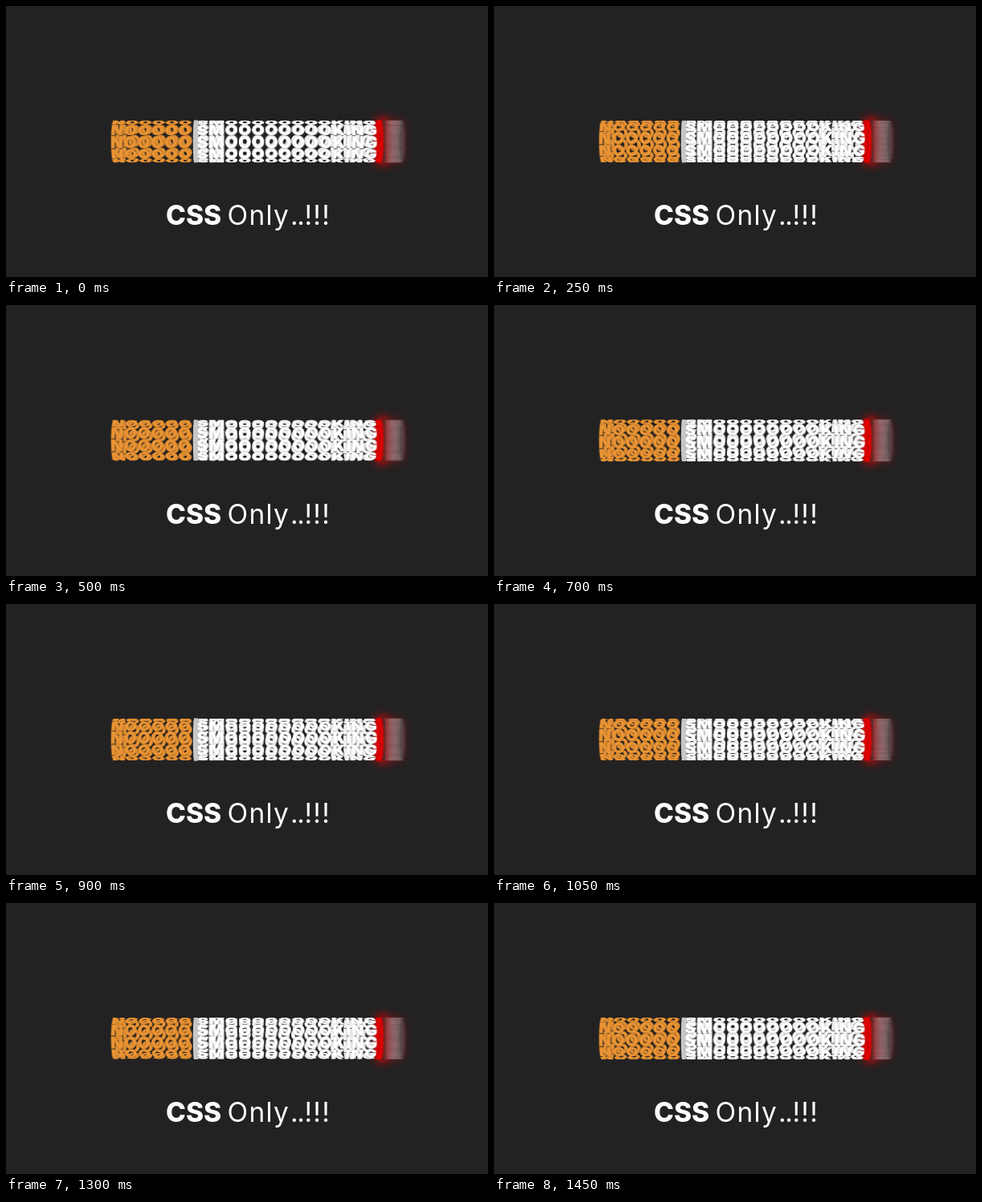
Recreate the animation shown at these times as an HTML page. Size 600 by 338 pixels, loop 1.5 s.

```html
<!DOCTYPE html>
<html lang="en">
<head>
<meta charset="utf-8">
<title>No smoking</title>
<style>
  html, body { margin: 0; width: 100%; height: 100%; overflow: hidden; background: #232223; }
  #stage {
    position: relative; width: 600px; height: 338px; overflow: hidden;
    background: #232223; perspective: 1470px;
    font-family: Inter, "Open Sans", sans-serif;
  }
  #drum { position: absolute; inset: 0; transform-style: preserve-3d; }
  .row { position: absolute; left: 0; top: 161px; width: 600px; height: 16px; }
  .row > * { position: absolute; top: 0; height: 16px; }
  .word {
    font-size: 20px; font-weight: 900; line-height: 16px; letter-spacing: 1px;
    white-space: nowrap; -webkit-text-stroke: .5px;
    text-shadow: 0 0 2px rgba(0, 0, 0, .55);
  }
  .filter { left: 133px; color: #ea9434; }
  .paper { left: 238.5px; color: #fff; }
  .row .seam { left: 234px; top: -.5px; width: 4.5px; height: 17px; background: #c8c8c8; }
  .row .ember {
    left: 460px; top: -.5px; width: 8px; height: 17px; filter: blur(1px);
    background: linear-gradient(90deg, rgba(190, 0, 0, .5), #e60000 40%, #e60000 75%, rgba(150, 0, 0, .4));
  }
  .row .ash {
    left: 468px; width: 25px; filter: blur(1.5px);
    background: linear-gradient(90deg, rgba(90, 20, 20, .32), rgba(235, 165, 170, .32) 45%, rgba(205, 160, 160, .27));
  }
  .glow { position: absolute; top: 143px; height: 52px; }
  .hot { left: 464px; width: 8px; box-shadow: 0 0 12px 3px rgba(255, 0, 0, .75); }
  .faint { left: 470px; width: 24px; box-shadow: 0 0 12px 1px rgba(255, 0, 0, .25); }
  svg { position: absolute; left: 0; top: 0; }
</style>
</head>
<body>
<div id="stage">
  <div class="glow faint"></div>
  <div class="glow hot"></div>
  <div id="drum"></div>
  <svg width="600" height="338" fill="#fdfdfd" font-size="33.5">
    <text x="199" y="273" font-weight="800">CSS</text>
    <g font-weight="400">
      <text x="275.5" y="273" letter-spacing="1.3">Only</text>
      <text x="354" y="273" letter-spacing="-1.5">..</text>
      <text x="371.5" y="273" letter-spacing="1.2">!!!</text>
    </g>
  </svg>
</div>
<script>
  const ROWS = 10, RADIUS = 25, LOOP = 1500, STEP = 50;
  const PITCH = 360 / ROWS, START = -3;
  const drum = document.getElementById('drum');

  const rows = Array.from({ length: ROWS }, () => {
    const row = document.createElement('div');
    row.className = 'row';
    row.innerHTML =
      '<span class="word filter">N' + 'O'.repeat(5) + '</span>' +
      '<i class="seam"></i>' +
      '<span class="word paper">SM' + 'O'.repeat(8) + 'KING</span>' +
      '<i class="ash"></i><i class="ember"></i>';
    drum.append(row);
    return row;
  });

  // The drum advances by two rows per loop.
  function draw(ms) {
    const t = Math.floor((ms % LOOP) / STEP) * STEP;
    const turn = START + 2 * PITCH * t / LOOP;
    rows.forEach((row, i) => {
      row.style.transform = `rotateX(${turn + i * PITCH}deg) translateZ(${RADIUS}px)`;
    });
  }

  let begin;
  function tick(now) {
    begin ??= now;
    draw(now - begin);
    requestAnimationFrame(tick);
  }
  draw(0);
  requestAnimationFrame(tick);
</script>
</body>
</html>
```
